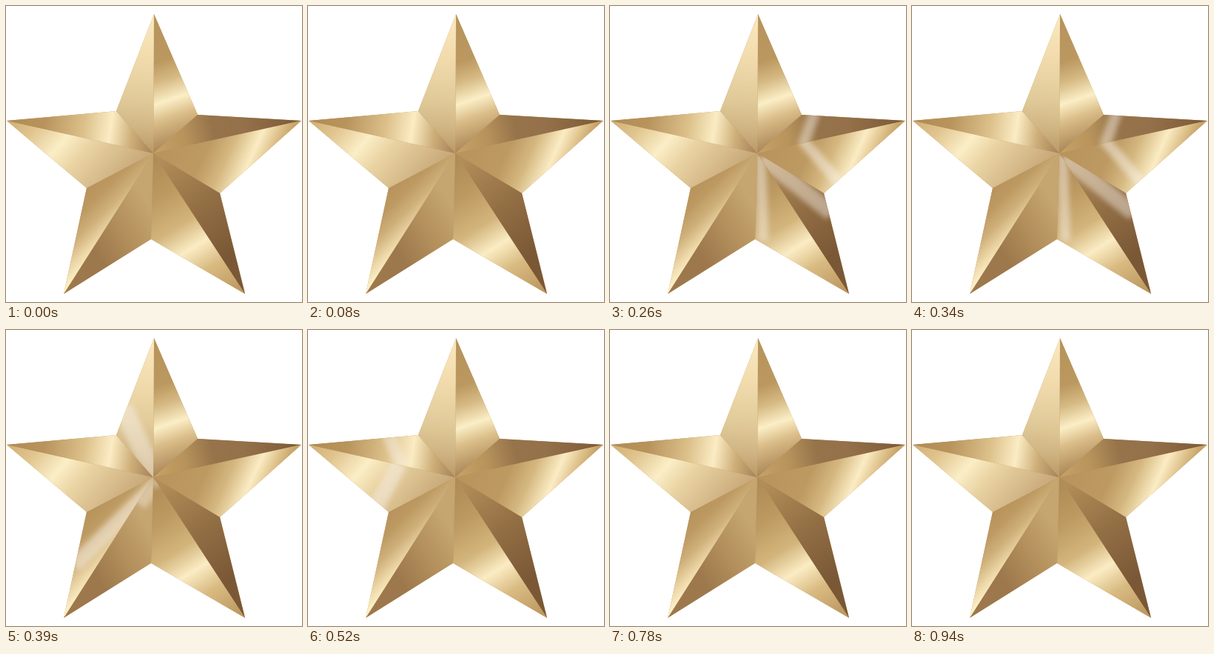
Recreate the animation shown at these times as an HTML page. Size 400 by 400 pixels, loop 1040 ms.

```html
<!DOCTYPE html>
<html lang="en">
<head>
<meta charset="utf-8">
<title>Gold star</title>
<style>
  html, body { margin: 0; width: 100%; height: 100%; overflow: hidden; background: #fff; }
  svg { display: block; width: 100vw; height: 100vh; }
</style>
</head>
<body>
<svg id="stage" viewBox="0 0 400 400">
  <defs id="defs">
    <filter id="soft" filterUnits="userSpaceOnUse" x="0" y="0" width="400" height="400">
      <feGaussianBlur stdDeviation="3.5"/>
    </filter>
  </defs>
</svg>
<script>
const NS = 'http://www.w3.org/2000/svg';
const stage = document.getElementById('stage');
const defs = document.getElementById('defs');

function add(parent, tag, attrs) {
  const el = document.createElementNS(NS, tag);
  for (const key in attrs) el.setAttribute(key, attrs[key]);
  return parent.appendChild(el);
}

const center = '199,199';
// Outline clockwise from the top tip
const rim = ['200,11', '259,147', '399,155', '289,253', '323,389',
             '196,315', '78,389', '109,246', '1,155', '149,142'];

// One facet between each pair of neighbouring rim points: gradient axis, then stops
const facets = [
  [[200, 11, 257, 181], '#b6935c 0,#bb985f .35,#d6ba84 .5,#fbeec6 .65,#dabd88 .78,#a98556 1'],
  [[199, 199, 399, 155], '#c6a266 0,#b8945c .22,#96734a .42,#94714a .62,#7c5936 1'],
  [[199, 199, 345, 264], '#b8945c 0,#bd9a62 .4,#d4b77f .58,#fbecc4 .77,#e0c48e .89,#c5a266 1'],
  [[215, 205, 310, 330], '#b28d58 0,#936f45 .5,#7a5836 1'],
  [[199, 199, 319, 392], '#ad8954 0,#bd9a61 .25,#d3b57c .45,#fbecc4 .6,#d9bb82 .75,#b8925a 1'],
  [[200, 280, 120, 330], '#c5a570 0,#b7945f .4,#9d784c 1'],
  [[109, 246, 165, 302], '#b8925c 0,#bd9a62 .25,#cfb07a .5,#ecd6a6 .75,#fdf0c8 .95'],
  [[1, 155, 134, 270], '#d0ae74 0,#e0c48e .2,#fbeec6 .43,#ead4a4 .6,#c8a878 1'],
  [[1, 155, 199, 185], '#b08b54 0,#b8935c .25,#dcc08a .52,#fbecc4 .7,#cdae78 .85,#a8835a 1'],
  [[200, 11, 192, 200], '#fbe9be 0,#f2dcae .3,#e2cb9a .6,#d2b786 .8,#b89865 1']
];

add(stage, 'polygon', { points: rim.join(' '), fill: '#b8945a' });

const layers = facets.map(([axis, stops], i) => {
  const points = [center, rim[i], rim[(i + 1) % 10]].join(' ');
  const [x1, y1, x2, y2] = axis;
  const grad = add(defs, 'linearGradient',
    { id: 'gold' + i, gradientUnits: 'userSpaceOnUse', x1, y1, x2, y2 });
  for (const stop of stops.split(',')) {
    const [color, offset] = stop.split(' ');
    add(grad, 'stop', { offset, 'stop-color': color });
  }
  const clip = add(defs, 'clipPath', { id: 'edge' + i });
  add(clip, 'polygon', { points });
  add(stage, 'polygon', { points, fill: `url(#gold${i})` });
  return add(stage, 'g', { 'clip-path': `url(#edge${i})` });
});

// Glints seen at each step of the sweep: facet, path, width, opacity
const glints = [
  [],
  [[3, 'M248 284 L312 318', 25, .62],
   [4, 'M248 282 L272 365', 36, .45]],
  [[1, 'M277 143 L260 190', 15, .45],
   [2, 'M259 180 L310 239', 15, .5],
   [3, 'M205 204 L300 280', 22, .45],
   [4, 'M203 200 L207 318', 15, .48]],
  [[9, 'M158 105 L202 200', 26, .48],
   [6, 'M212 199 L92 318', 20, .5],
   [5, 'M212 197 L180 236', 20, .4],
   [4, 'M199 200 L206 212', 14, .4]],
  [[8, 'M108 142 L128 186', 17, .42],
   [7, 'M124 180 L92 240', 21, .48]]
];

const sweep = glints.map(list => list.map(([facet, d, width, opacity]) =>
  add(layers[facet], 'path', {
    d, fill: 'none', stroke: '#f8f2ea', 'stroke-width': width,
    opacity, filter: 'url(#soft)', display: 'none'
  })));

const STEP = 130, LOOP = 1040;

function draw(ms) {
  const now = Math.floor((ms % LOOP) / STEP);
  sweep.forEach((paths, step) => {
    for (const path of paths) path.setAttribute('display', step === now ? 'inline' : 'none');
  });
}

const start = performance.now();
function tick() {
  draw(performance.now() - start);
  requestAnimationFrame(tick);
}
tick();
</script>
</body>
</html>
```
